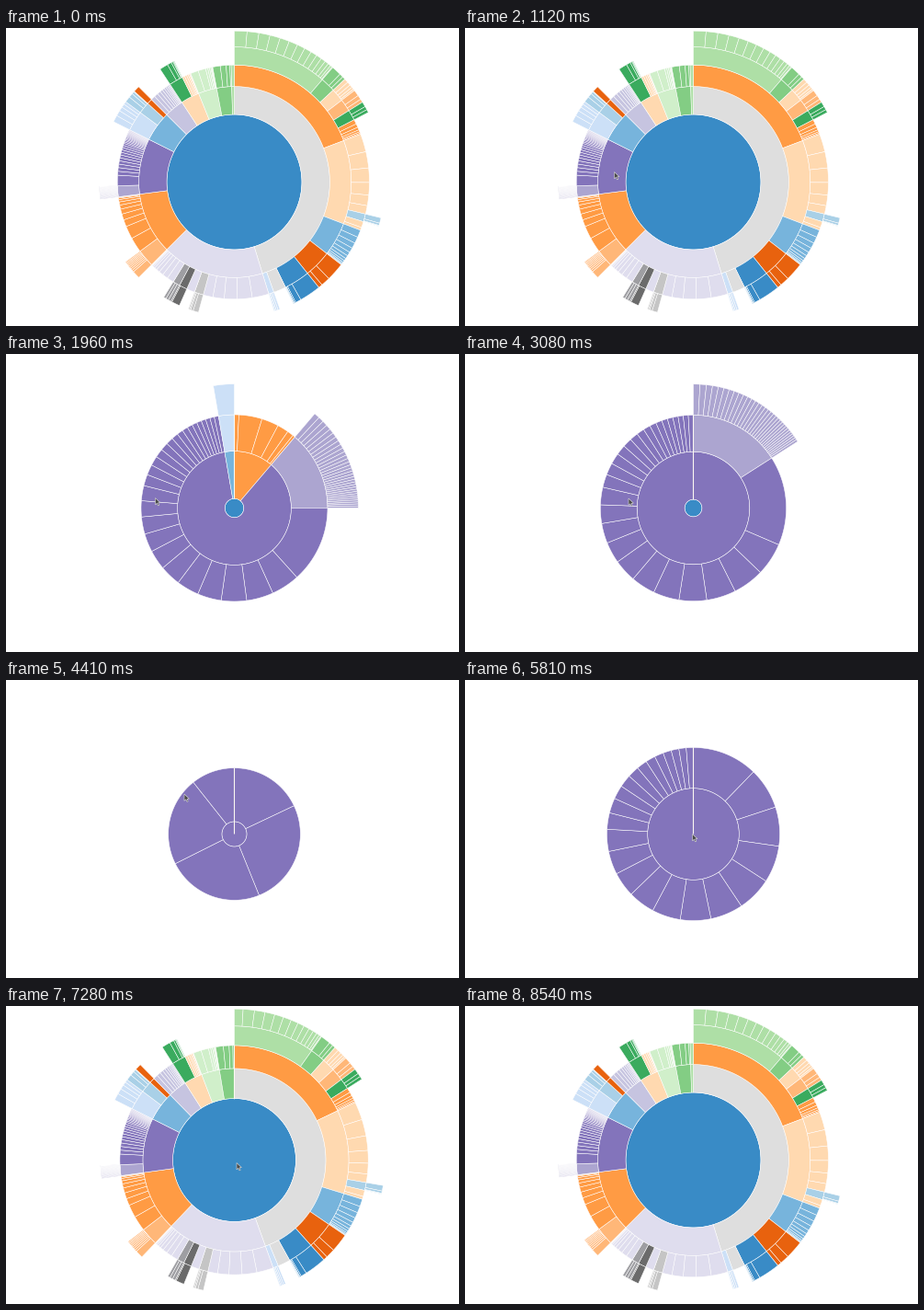
Recreate the animation shown at these times as a matplotlib script. Size 493 by 324 pixels, loop 9.31 s.

```python
import numpy as np
import matplotlib.pyplot as plt
from matplotlib.animation import FuncAnimation
from matplotlib.collections import PolyCollection
from matplotlib.patches import Polygon

W, H, DPI = 493, 324, 64
STEP, FRAMES = 70, 133
CX, CY, R, HUB = 248.5, 167.5, 164.3, 9.4
LEVELS = 5
ZOOM_MS = 750

PALETTE = dict(
    blue="#398bc6", sky="#77b4dc", pale="#a9d0e7", ice="#cce0f7",
    rust="#e8620e", orange="#ff9b44", apricot="#ffb778", peach="#ffd9b0",
    green="#3aab5e", leaf="#83cd84", mint="#aedfa6", foam="#d0efca",
    purple="#8374bb", violet="#aca5d0", lilac="#c6c4e0", mist="#dfddee",
    coal="#6b6b6b", steel="#9e9ea2", silver="#c5c5c5", grey="#dedede")


def px(width):
    return width * 72 / DPI


# ---- hierarchy ----

def spread(total, n, high, low):
    """n sizes falling from high to low, bent so that they sum to total."""
    fall = 1 - np.arange(n) / (n - 1)
    p_min, p_max = 0.02, 50
    for _ in range(50):
        power = (p_min + p_max) / 2
        sizes = low + (high - low) * fall ** power
        if sizes.sum() > total:
            p_min = power
        else:
            p_max = power
    return sizes.tolist()


def group(color, leaves, *subgroups):
    """A node is (size, color, children), children from large to small."""
    kids = [(v, color, []) for v in leaves] + list(subgroups)
    kids.sort(key=lambda k: -k[0])
    return sum(k[0] for k in kids), color, kids


def build_tree():
    analytics = group(
        "sky", [],
        group("pale", spread(15207, 4, 6714, 743)),
        group("ice", spread(26435, 5, 7840, 3416)),
        group("rust", [7074]))
    animate = group(
        "orange", [19975, 17010] + spread(39958, 9, 9201, 449),
        group("apricot", [8746] + spread(14335, 8, 2202, 1375)))
    data = group(
        "peach", spread(11935, 6, 3331, 586),
        group("green", spread(18349, 5, 9800, 721)))
    display = group("leaf", spread(24254, 4, 10066, 1732))
    flex = group("mint", [4116])
    physics = group("foam", [10498, 9983] + spread(9453, 6, 2822, 319))
    query = group(
        "purple", [13896] + spread(42302, 11, 5130, 2732)
        + spread(19197, 16, 2039, 781),
        group("violet", spread(14326, 32, 772, 264)))
    scale = group("lilac", spread(31294, 10, 5833, 1316))
    util = group(
        "mist", spread(133278, 16, 22026, 335),
        group("coal", [9354, 1233]),
        group("steel", spread(9346, 3, 3366, 2815)),
        group("silver", spread(11946, 4, 6367, 1229)))
    operator = group(
        "orange", spread(17818, 6, 5248, 1286),
        group("apricot", spread(14219, 3, 6314, 3444)),
        group("peach", spread(14897, 5, 4138, 1690)),
        group("green", spread(11893, 3, 5219, 3165)),
        group("leaf", spread(17057, 3, 9956, 3202)),
        group("mint", spread(108083, 15, 12870, 870)))
    vis = group(
        "grey", [16540], operator,
        group("blue", spread(33886, 5, 24593, 636)),
        group("sky", spread(44639, 11, 8435, 763)),
        group("peach", spread(101716, 8, 20544, 3301),
              group("pale", spread(8867, 4, 5569, 353))),
        group("ice", spread(7011, 4, 2313, 1117)),
        group("rust", spread(36003, 3, 20859, 4614)))
    return group("blue", [], analytics, animate, data, display, flex,
                 physics, query, scale, util, vis)


def flatten(node, start, total, depth, out):
    size, color, kids = node
    out.append((start / total, (start + size) / total, depth, color))
    for kid in kids:
        flatten(kid, start, total, depth + 1, out)
        start += kid[0]
    return out


tree = build_tree()
arcs = flatten(tree, 0, tree[0], 0, [])


# ---- zooming ----

def focus(arc):
    """View on one arc: angular domain, radial domain start, hub radius."""
    x0, x1, depth, _ = arc
    return np.array([x0, x1, depth / LEVELS, HUB if depth else 0])


home = focus(arcs[0])
query_arc = next(a for a in arcs if a[2] == 1 and a[3] == "purple")
query_kids = [a for a in arcs if a[2] == 2
              and query_arc[0] - 1e-9 <= a[0] < query_arc[1] - 1e-9]
branch, twig = focus(query_arc), focus(query_kids[16])
ZOOMS = [(1331, branch), (3849, twig), (5363, branch), (6665, home)]


def cubic(t):
    return 4 * t ** 3 if t < 0.5 else 1 - 4 * (1 - t) ** 3


def view_at(ms):
    view = home
    for start, goal in ZOOMS:
        if ms > start:
            e = cubic(min(1, (ms - start) / ZOOM_MS))
            view = view + (goal - view) * e
    return view


def radius(y, view):
    root, hub = np.sqrt(view[2]), view[3]
    return max(0.0, hub + (R - hub) * (np.sqrt(y) - root) / (1 - root))


def wedge(a0, a1, r0, r1):
    n = 2 + int((a1 - a0) * 28)
    a = np.linspace(a0, a1, n)
    ring = np.column_stack([np.sin(a), -np.cos(a)])
    if r0 <= 0:
        full = a1 - a0 > 2 * np.pi - 1e-6
        inner = np.empty((0, 2)) if full else np.zeros((1, 2))
    else:
        inner = ring[::-1] * r0
    return np.vstack([ring * r1, inner]) + (CX, CY)


def wedges_for(view):
    lo, hi = view[:2]
    radii = [radius(k / LEVELS, view) for k in range(LEVELS + 1)]
    shapes, fills = [], []
    for x0, x1, depth, color in arcs:
        s0, s1 = np.clip([(x0 - lo) / (hi - lo), (x1 - lo) / (hi - lo)], 0, 1)
        r0, r1 = radii[depth], radii[depth + 1]
        if s1 - s0 < 1e-6 or r1 <= 0:
            continue
        shapes.append(wedge(s0 * 2 * np.pi, s1 * 2 * np.pi, r0, r1))
        fills.append(PALETTE[color])
    return shapes, fills, radii


# ---- pointer ----

# Each move: start, end, place reached.
ENTRY = (454, 25)
MOVES = [(70, 840, (162.5, 156.5)), (2240, 2900, (178, 157)),
         (3220, 3640, (194, 124)), (4830, 5110, (247.5, 167.5)),
         (6300, 6500, (251, 170.5)), (7400, 8330, (447, 30))]
ARROW = np.array([(0, 0), (0, 7.4), (1.8, 5.8), (3, 8.4), (4.2, 7.9),
                  (3.1, 5.3), (5.4, 5.2)])


def pointer_at(ms):
    spot = np.array(ENTRY, float)
    for start, end, goal in MOVES:
        u = np.clip((ms - start) / (end - start), 0, 1)
        spot += (goal - spot) * u * u * (3 - 2 * u)
    return spot


# ---- stage ----

fig = plt.figure(figsize=(W / DPI, H / DPI), dpi=DPI, facecolor="white")
ax = fig.add_axes([0, 0, 1, 1])
ax.set_xlim(0, W)
ax.set_ylim(H, 0)
ax.axis("off")

sectors = PolyCollection([], edgecolors="white", linewidths=px(0.5),
                         joinstyle="round", zorder=1)
ax.add_collection(sectors, autolim=False)
# Arcs squeezed to nothing pile up as one bright line at twelve o'clock.
seam, = ax.plot([], [], color="#fbf9f2", lw=px(1.1), zorder=2,
                solid_capstyle="butt", snap=False)
pointer = ax.add_patch(Polygon(ARROW, fc="#4a4a4a", ec="#d8d8d8",
                               lw=px(0.6), zorder=3))


def draw(frame):
    ms = frame * STEP
    view = view_at(ms)
    shapes, fills, radii = wedges_for(view)
    sectors.set_verts(shapes)
    sectors.set_facecolor(fills)

    seam.set_visible(view[0] > 1e-3)
    seam.set_data([CX, CX], [CY - radii[1], CY - radii[3]])

    pointer.set_visible(MOVES[0][0] <= ms <= MOVES[-1][1])
    pointer.set_xy(ARROW + pointer_at(ms))
    return sectors, seam, pointer


anim = FuncAnimation(fig, draw, frames=FRAMES, interval=STEP,
                     init_func=lambda: draw(0), repeat=True, repeat_delay=0)
plt.show()
```
